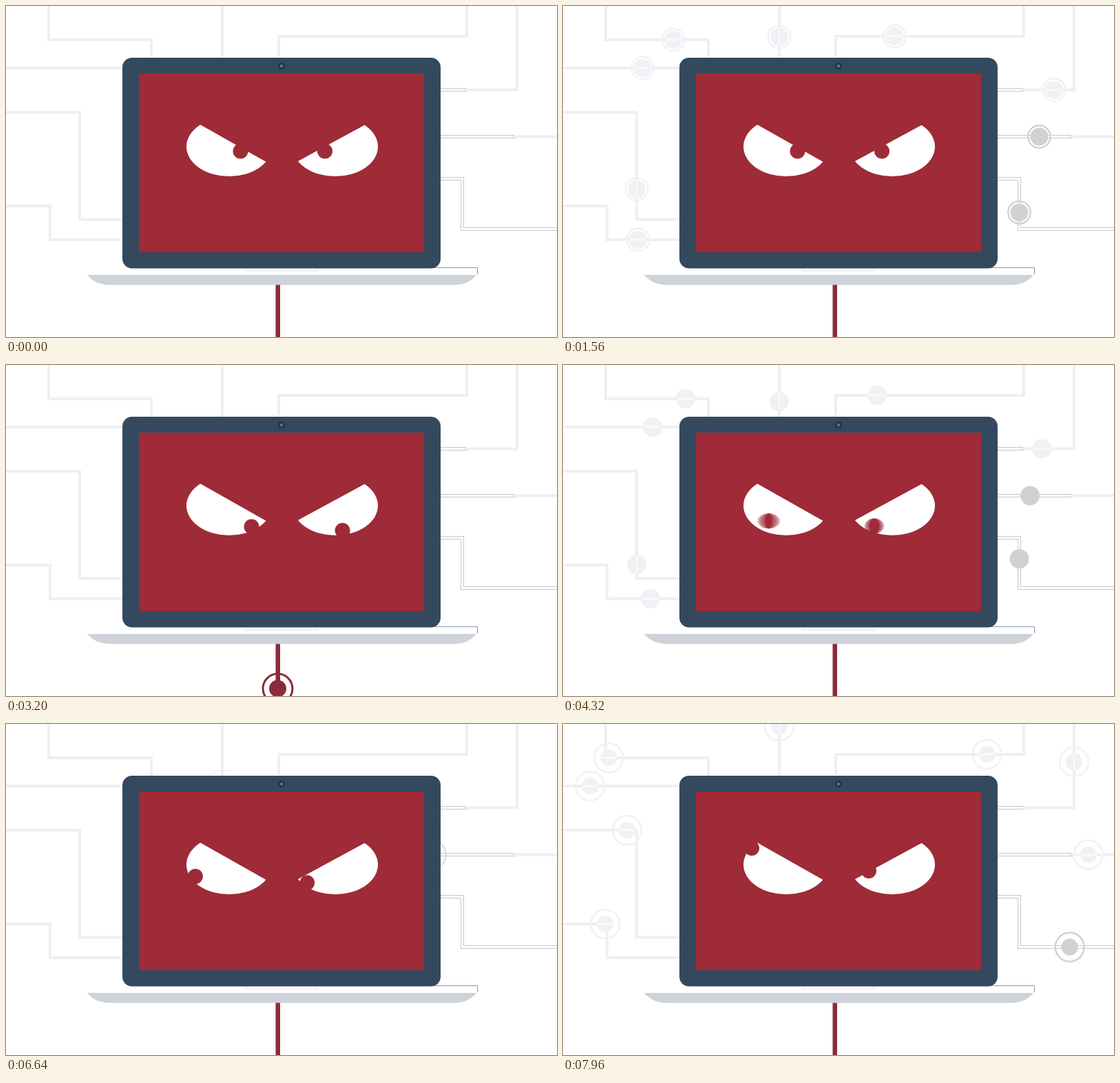
An HTML page with a canvas for the animation above (8000 ms loop, 800 by 480 pixels).

```html
<!DOCTYPE html>
<html lang="en">
<head>
<meta charset="utf-8">
<title>Infected laptop</title>
<style>
html, body { margin: 0; width: 100%; height: 100%; overflow: hidden; background: #fff; }
canvas { display: block; }
</style>
</head>
<body>
<canvas id="stage" width="800" height="480"></canvas>
<script>
const ctx = document.getElementById('stage').getContext('2d');
const TAU = Math.PI * 2;
const LOOP = 8000, CYCLE = 2880, PULSE = 480;
const RED = '#9e2b37', DARK = '#34495e', PALE = '#eeeff6', GREY = '#c6c8cd';
const NODE_PALE = '#f1f1f5', NODE_GREY = '#d0d1d3', NODE_RED = '#8a2b3a';

// Each wire runs outward from the laptop; start and span set its node's travel.
const wires = [
  { pts: [[211, 75], [211, 49], [62, 49], [62, 0]], start: 59, span: 112 },
  { pts: [[169, 90], [0, 90]], start: 39, span: 91 },
  { pts: [[169, 309.5], [107, 309.5], [107, 154], [0, 154]], start: 82, span: 150 },
  { pts: [[169, 339], [64, 339], [64, 290], [0, 290]], start: 42, span: 115 },
  { pts: [[314, 75], [314, 0]], start: 22, span: 50 },
  { pts: [[396, 73], [396, 44], [669, 44], [669, 0]], start: 89, span: 160 },
  { pts: [[631, 121.5], [742, 121.5], [742, 0]], start: 64, span: 114, outline: 668 },
  { pts: [[631, 189.5], [800, 189.5]], start: 47, span: 85, outline: 738, greyTo: 745 },
  { pts: [[631, 250.5], [662.5, 250.5], [662.5, 323.5], [800, 323.5]],
    start: 62, span: 116, outline: 800, greyTo: 900 }
];

// Pupil rest positions: left x, y, right x, y
const looks = [
  { at: 0, pos: [340.5, 210.5, 463, 210.5] },
  { at: 1630, pos: [356.5, 234.5, 488.5, 240] },
  { at: 4115, pos: [275, 223, 437, 231] },
  { at: 6600, pos: [274, 180, 444, 213] }
];
const LOOK_TIME = 320;

const mod = (a, n) => ((a % n) + n) % n;
const smooth = x => x * x * (3 - 2 * x);

function line(pts, color, width) {
  ctx.beginPath();
  pts.forEach(p => ctx.lineTo(p[0], p[1]));
  ctx.strokeStyle = color;
  ctx.lineWidth = width;
  ctx.stroke();
}

function disc(x, y, rx, color, ry = rx) {
  ctx.beginPath();
  ctx.ellipse(x, y, rx, ry, 0, 0, TAU);
  ctx.fillStyle = color;
  ctx.fill();
}

function box(x, y, w, h, color, r = 0) {
  ctx.beginPath();
  ctx.roundRect(x, y, w, h, r);
  ctx.fillStyle = color;
  ctx.fill();
}

function drawWire(w) {
  line(w.pts, PALE, 4);
  if (!w.outline) return;
  ctx.save();
  ctx.beginPath();
  ctx.rect(631, 100, w.outline - 631, 250);
  ctx.clip();
  line(w.pts, '#fff', 6);
  line(w.pts, GREY, 5);
  line(w.pts, '#fff', 3);
  ctx.restore();
  if (w.outline < 800) {
    const y = w.pts[0][1];
    line([[w.outline - 4, y - 3], [w.outline + 2, y + 3]], GREY, 1);
  }
}

// Point at distance d, continuing straight past either end.
function along(pts, d) {
  for (let i = 1; ; i++) {
    const [ax, ay] = pts[i - 1], [bx, by] = pts[i];
    const len = Math.hypot(bx - ax, by - ay);
    const dx = (bx - ax) / len, dy = (by - ay) / len;
    if (d <= len || i === pts.length - 1) return { x: ax + dx * d, y: ay + dy * d, dx, dy };
    d -= len;
  }
}

function drawNode(x, y, phase, color, width) {
  const k = mod(phase, PULSE) / PULSE;
  disc(x, y, 13 + Math.cos(k * TAU), color);
  ctx.globalAlpha = Math.min(1, (1 - k) * 4);
  ctx.beginPath();
  ctx.arc(x, y, 13 + 11.5 * Math.sin(k * Math.PI / 2) - width / 2, 0, TAU);
  ctx.strokeStyle = color;
  ctx.lineWidth = width;
  ctx.stroke();
  ctx.globalAlpha = 1;
}

function drawNodes(phase) {
  for (const w of wires) {
    const d = w.start + w.span * phase * 0.00131;
    if (d < -25) continue;
    const p = along(w.pts, d);
    const grey = p.x < (w.greyTo || 0);
    drawNode(p.x, p.y, phase, grey ? NODE_GREY : NODE_PALE, 2.4);
    if (!grey) {
      line([[p.x - p.dx * 12, p.y - p.dy * 12], [p.x + p.dx * 12, p.y + p.dy * 12]], '#fafafc', 2.5);
    }
  }
}

function drawRedWire(phase) {
  ctx.save();
  ctx.beginPath();
  ctx.rect(360, 404, 80, 76);
  ctx.clip();
  box(391.5, 404, 6.5, 76, '#8d2c3b');
  const y = 469 + (phase - 1760) * 0.26;
  if (y > 375 && y < 510) drawNode(394.5, y, phase, NODE_RED, 3);
  ctx.restore();
}

function drawLaptop() {
  box(118, 380, 566, 10, '#fff');
  line([[347.5, 380], [347.5, 384.5], [452.5, 384.5], [452.5, 380]], '#e4e6ec', 1);
  line([[620, 379.5], [684.5, 379.5], [684.5, 389]], '#8c94ab', 1);
  ctx.beginPath();
  ctx.moveTo(118, 390);
  ctx.quadraticCurveTo(130, 404.5, 151, 404.5);
  ctx.lineTo(651, 404.5);
  ctx.quadraticCurveTo(671, 404.5, 683, 390);
  ctx.fillStyle = '#ced3da';
  ctx.fill();
  box(169, 75, 462, 305.5, DARK, 14);
  disc(400, 87, 5, '#22344a');
  disc(400, 87, 2.2, '#60788f');
  box(193, 98, 414, 259, RED);
}

function pupilsAt(t) {
  let i = looks.length - 1;
  while (looks[i].at > t) i--;
  const to = looks[i].pos, from = looks[Math.max(0, i - 1)].pos;
  const e = smooth(Math.min(1, (t - looks[i].at) / LOOK_TIME));
  return to.map((v, n) => from[n] + (v - from[n]) * e);
}

function drawPupil(x, y, blur) {
  const r = 11;
  if (blur > 0.5) {
    ctx.globalAlpha = 0.25;
    for (let n = 3; n > -3; n--) disc(x, y, r + blur * n / 3, RED, r);
    ctx.globalAlpha = 1;
  }
  disc(x, y, r - blur, RED, r);
}

function drawEye(cx, outer, inner) {
  disc(cx, 204, 62, '#fff', 43);
  // Lid: everything above the brow line
  const slope = (inner[1] - outer[1]) / (inner[0] - outer[0]);
  const edge = x => [x, outer[1] + (x - outer[0]) * slope];
  const [l, r] = [cx - 66, cx + 66];
  ctx.beginPath();
  [edge(l), edge(r), [r, 150], [l, 150]].forEach(p => ctx.lineTo(p[0], p[1]));
  ctx.fillStyle = RED;
  ctx.fill();
}

function drawFace(t) {
  drawEye(324, [282, 172], [378, 226.3]);
  drawEye(478, [521, 172.5], [423.5, 225.3]);
  const p = pupilsAt(t), before = pupilsAt(Math.max(0, t - 20));
  for (const n of [0, 2]) {
    drawPupil(p[n], p[n + 1], Math.min(8, Math.abs(p[n] - before[n]) * 0.8));
  }
}

function draw(t) {
  const phase = mod(t - 1440 + 700, CYCLE) - 700;
  ctx.fillStyle = '#fff';
  ctx.fillRect(0, 0, 800, 480);
  wires.forEach(drawWire);
  drawNodes(phase);
  drawRedWire(phase);
  drawLaptop();
  drawFace(t);
}

function frame() {
  draw(performance.now() % LOOP);
  requestAnimationFrame(frame);
}
frame();
</script>
</body>
</html>
```
